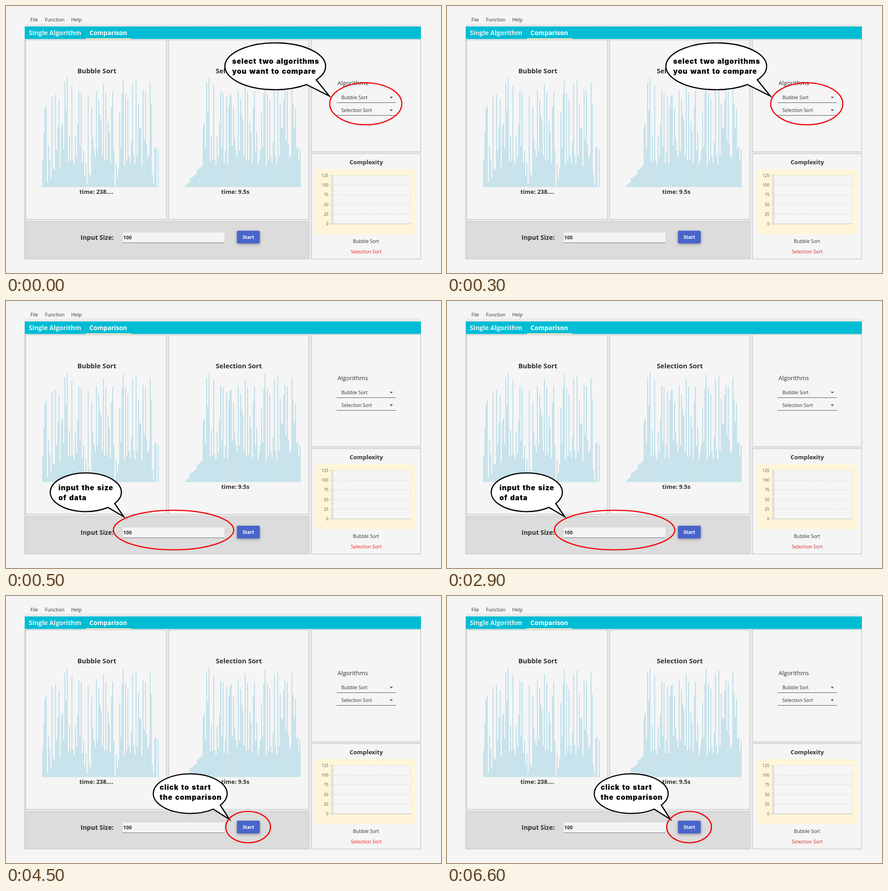
Write an HTML page with a canvas that moves like this. It is 954 by 587 pixels and loops after 8000 ms.

```html
<!DOCTYPE html>
<html lang="en">
<head>
<meta charset="utf-8">
<title>Sorting comparison</title>
<style>
  html, body { margin: 0; width: 100%; height: 100%; overflow: hidden; background: #f5f5f5; }
  canvas { display: block; }
</style>
</head>
<body>
<canvas id="stage" width="954" height="587"></canvas>
<script>
const ctx = document.getElementById('stage').getContext('2d');
const LOOP = 8000;
const INK = '#303030';

// Bar heights of the unsorted data
const data = [
  58, 120, 172, 179, 10, 91, 61, 20, 199, 41, 38, 203, 81, 131, 191, 44, 133, 140, 84, 230,
  168, 240, 56, 113, 58, 224, 60, 49, 111, 65, 138, 211, 90, 208, 53, 80, 24, 52, 8, 201,
  28, 22, 176, 108, 81, 66, 212, 80, 193, 160, 146, 69, 227, 58, 208, 60, 144, 120, 53, 177,
  210, 80, 3, 50, 20, 39, 163, 88, 205, 237, 48, 206, 58, 193, 68, 53, 98, 227, 70, 50,
  234, 68, 183, 130, 128, 46, 213, 103, 210, 93, 63, 70, 230, 182, 27, 6, 85, 88, 1, 82
];

// Data after the given number of selection sort passes
function selectionPasses(source, passes) {
  const a = source.slice();
  for (let i = 0; i < passes; i++) {
    let low = i;
    for (let j = i + 1; j < a.length; j++) if (a[j] < a[low]) low = j;
    [a[i], a[low]] = [a[low], a[i]];
  }
  return a;
}
const partlySorted = selectionPasses(data, 16);

const scenes = [
  {
    until: 500,
    bubble: [590.5, 132.5, 110.5, 51.5], tip: [709, 198],
    ring: [789, 215, 79, 46],
    lines: ['select two algorithms', 'you want to compare'], at: [496, 127]
  },
  {
    until: 4500,
    bubble: [175, 420.5, 78, 42.5], tip: [258, 474],
    ring: [367.5, 503.5, 132, 43.5],
    lines: ['input the size', 'of data'], at: [115, 416]
  },
  {
    until: LOOP,
    bubble: [404, 434.5, 81, 43.5], tip: [490, 491],
    ring: [531, 508, 49, 34.5],
    lines: ['click to start', 'the comparison'], at: [337, 426]
  }
];

function rect(x, y, w, h, color) {
  ctx.fillStyle = color;
  ctx.fillRect(x, y, w, h);
}

function line(x1, y1, x2, y2, color, width = 1, dash = []) {
  ctx.strokeStyle = color;
  ctx.lineWidth = width;
  ctx.setLineDash(dash);
  ctx.beginPath();
  ctx.moveTo(x1, y1);
  ctx.lineTo(x2, y2);
  ctx.stroke();
  ctx.setLineDash([]);
}

function text(str, x, y, size, { weight = 400, color = INK, align = 'left' } = {}) {
  ctx.font = `${weight} ${size}px "Open Sans", sans-serif`;
  ctx.textAlign = align;
  ctx.fillStyle = color;
  ctx.fillText(str, x, y);
}

const bold = (str, x, y, size, color = INK, align = 'left') =>
  text(str, x, y, size, { weight: 700, color, align });

function panel(x, y, w, h, fill) {
  rect(x, y, w, h, fill);
  ctx.strokeStyle = '#c9c9c9';
  ctx.lineWidth = 1.4;
  ctx.strokeRect(x, y, w, h);
}

function bars(heights, left) {
  heights.forEach((h, i) => rect(left - 0.8 + i * 2.56, 398 - h, 1.6, h, '#add8e6'));
}

function dropdown(label, y) {
  text(label, 735.5, y + 4, 10.5);
  line(725, y + 11.5, 855, y + 11.5, '#555');
  ctx.fillStyle = '#555';
  ctx.beginPath();
  ctx.moveTo(841.5, y - 1.5);
  ctx.lineTo(848.5, y - 1.5);
  ctx.lineTo(845, y + 2.2);
  ctx.fill();
}

function header() {
  text('File', 53.5, 34, 10.6);
  text('Function', 85.5, 34, 10.6);
  text('Help', 143, 34, 10.6);
  const shade = ctx.createLinearGradient(0, 33, 0, 45);
  shade.addColorStop(0, '#f5f5f5');
  shade.addColorStop(1, '#e6e6e6');
  rect(41, 38, 869, 7, shade);
  rect(41, 45, 869, 27.5, '#00bcd4');
  bold('Single Algorithm', 50, 64, 13.95, '#e4f4f2');
  bold('Comparison', 183, 64, 13.75, '#fff');
  rect(175, 71, 100, 2, '#f3efbd');
}

function complexityChart() {
  bold('Complexity', 790, 347.5, 13, INK, 'center');
  rect(680, 359, 220, 143, '#fff6d9');
  rect(716, 372, 172, 107, '#f5f5f5');
  for (let v = 0; v <= 125; v += 5) {
    const y = 479 - v * 0.852;
    const major = v % 25 === 0;
    line(major ? 710 : 712, y, 716, y, '#bdbdbd', 0.8);
    if (!major) continue;
    text(String(v), 707, y + 3.2, 8.8, { color: '#555', align: 'right' });
    if (v) line(716, y, 888, y, '#d6d6d6', 1, [4, 2]);
  }
  line(716.5, 372, 716.5, 479, '#bdbdbd');
  line(710, 479, 889, 479, '#bdbdbd');
  line(888.5, 372, 888.5, 479, '#e3e3e3', 1, [4, 2]);
  text('Bubble Sort', 789.5, 521, 10.5, { align: 'center' });
  text('Selection Sort', 790, 544, 10.55, { color: '#e02020', align: 'center' });
}

function inputBar() {
  bold('Input Size:', 163.5, 514, 14);
  rect(256, 498, 223, 22, '#f4f4f4');
  line(256, 520.5, 479, 520.5, '#76697f', 1.2);
  bold('100', 257, 512.5, 10.9);
  ctx.save();
  ctx.shadowColor = 'rgba(0,0,0,0.35)';
  ctx.shadowBlur = 6;
  ctx.shadowOffsetY = 2;
  ctx.fillStyle = '#4964cb';
  ctx.beginPath();
  ctx.roundRect(506.5, 494, 50, 28, 2.5);
  ctx.fill();
  ctx.restore();
  bold('Start', 531.5, 512, 10.2, '#fff', 'center');
}

function app() {
  rect(0, 0, 954, 587, '#f5f5f5');
  header();
  rect(40, 73, 870.5, 484, '#eaeaea');
  panel(43.5, 74.5, 308.5, 394.5, '#f5f5f5');
  panel(357, 74.5, 306.5, 394.5, '#f5f5f5');
  panel(43.5, 474, 620.5, 82, '#dcdcdc');
  panel(670, 73.5, 239.5, 247, '#f5f5f5');
  panel(670, 324.5, 239.5, 231.5, '#f5f5f5');
  line(41, 73, 41, 557, '#c8c8c8', 1.5);

  bold('Bubble Sort', 156.5, 148, 14.7);
  bold('Selection Sort', 460, 148, 14.7);
  bars(data, 80.5);
  bars(partlySorted, 391.5);
  bold('time: 238....', 161, 413, 12.95);
  bold('time: 9.5s', 472, 413, 12.95);

  text('Algorithms', 727, 174, 13.2);
  dropdown('Bubble Sort', 201);
  dropdown('Selection Sort', 229);
  complexityChart();
  inputBar();
}

function callout({ bubble, tip, ring, lines, at }) {
  ctx.lineWidth = 2.6;
  ctx.lineJoin = 'miter';
  ctx.beginPath();
  ctx.ellipse(...bubble, 0, 0.9, 0.62 + Math.PI * 2);
  ctx.lineTo(...tip);
  ctx.closePath();
  ctx.fillStyle = '#fff';
  ctx.fill();
  ctx.strokeStyle = '#000';
  ctx.stroke();

  ctx.beginPath();
  ctx.ellipse(...ring, 0, 0, Math.PI * 2);
  ctx.strokeStyle = '#f00808';
  ctx.stroke();

  ctx.save();
  ctx.font = '900 15.6px Inter, sans-serif';
  ctx.letterSpacing = '0.85px';
  ctx.wordSpacing = '1.6px';
  ctx.textAlign = 'left';
  ctx.lineJoin = 'round';
  ctx.strokeStyle = '#fff';
  ctx.lineWidth = 3;
  ctx.fillStyle = '#000';
  lines.forEach((str, i) => {
    const y = at[1] + i * 22;
    ctx.strokeText(str, at[0], y);
    ctx.fillText(str, at[0], y);
  });
  ctx.restore();
}

function frame() {
  const t = performance.now() % LOOP;
  app();
  callout(scenes.find(s => t < s.until));
  requestAnimationFrame(frame);
}
frame();
</script>
</body>
</html>
```
